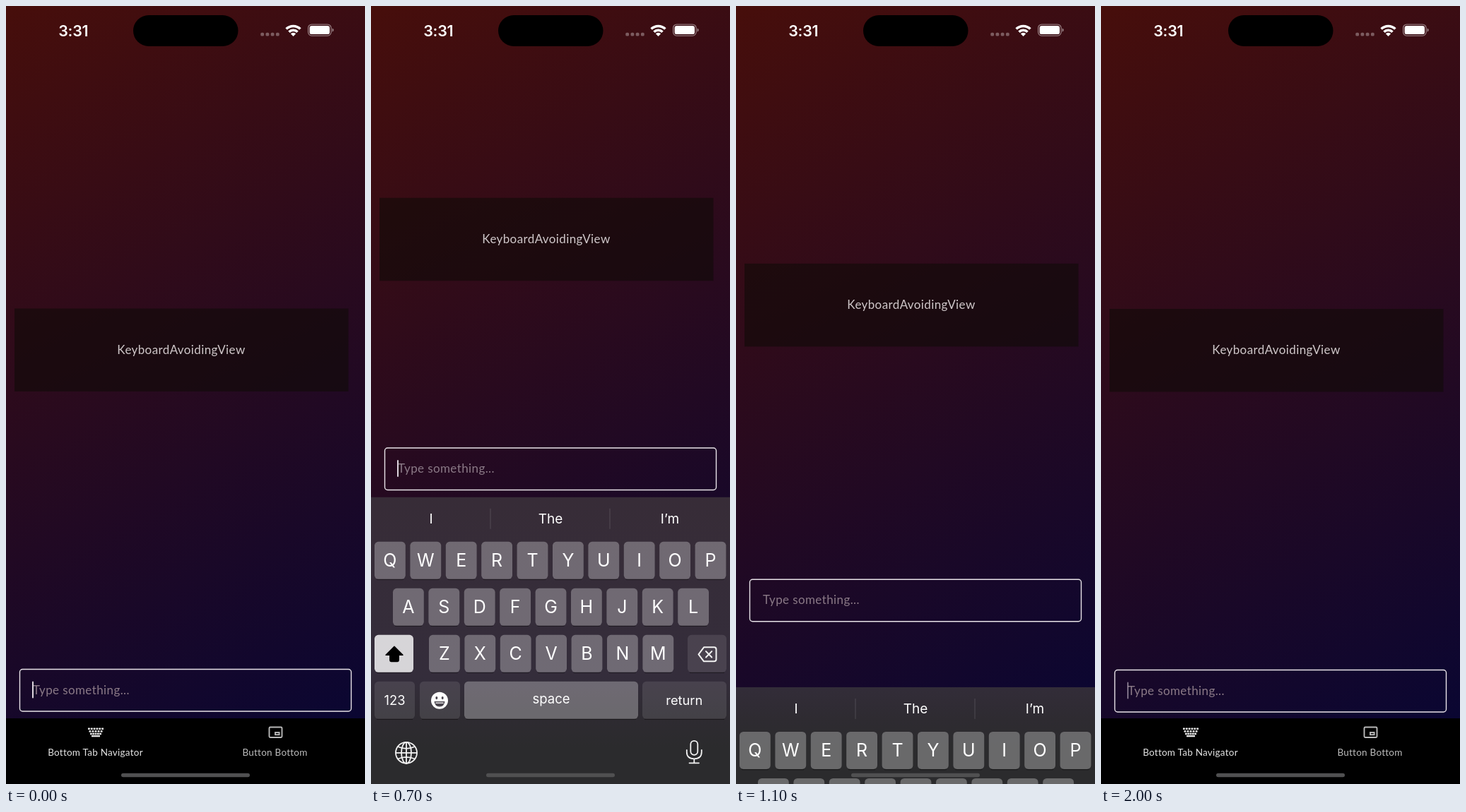
Animation of 508x1102 px, one loop 2.1 s. Source, as an HTML page:

```html
<!DOCTYPE html>
<html lang="en">
<head>
<meta charset="utf-8">
<title>Keyboard avoiding view</title>
<style>
  html, body { margin: 0; width: 100%; height: 100%; overflow: hidden; background: #000; }
  svg { display: block; width: 100%; height: 100%; }
  .app { font-family: Lato, "Open Sans", sans-serif; font-size: 17px; letter-spacing: .4px; }
  .tab { font-family: Lato, "Open Sans", sans-serif; font-size: 13.5px; letter-spacing: .25px; }
  .sys { font-family: Inter, Roboto, sans-serif; fill: #fff; }
  .mid { text-anchor: middle; }
  .line { fill: none; stroke: #f2f2f2; stroke-width: 2; stroke-linecap: round; stroke-linejoin: round; }
</style>
</head>
<body>
<svg viewBox="0 0 508 1102">
  <defs>
    <linearGradient id="sky" gradientUnits="userSpaceOnUse" x1="0" y1="0" x2="508" y2="1009">
      <stop offset="0" stop-color="#470e0b"/>
      <stop offset="1" stop-color="#0a0632"/>
    </linearGradient>
    <linearGradient id="blur" gradientUnits="userSpaceOnUse" x1="0" y1="693" x2="0" y2="1050">
      <stop offset="0" stop-color="#372c37"/>
      <stop offset=".72" stop-color="#342d3b"/>
      <stop offset=".89" stop-color="#2e2b31"/>
      <stop offset="1" stop-color="#2b2b2d"/>
    </linearGradient>
  </defs>

  <rect width="508" height="1102" fill="url(#sky)"/>

  <g id="card">
    <rect x="12" width="472.5" height="117.5" fill="#100a08" fill-opacity=".6"/>
    <text class="app mid" x="248" y="64" fill="#cfc7c9">KeyboardAvoidingView</text>
  </g>

  <g id="field">
    <rect x="19.5" y=".5" width="469" height="59.5" rx="4" fill="none" stroke="#e8e3e8" stroke-width="1.4"/>
    <text class="app" x="38" y="35.5" fill="#8a7986">Type something...</text>
    <rect id="caret" x="37" y="17.5" width="2" height="24" rx="1" fill="#ddd5dd"/>
  </g>

  <g id="tabs">
    <rect y="1009" width="508" height="93" fill="#000"/>
    <g id="keysIcon" fill="#e6e6e6"></g>
    <g fill="none" stroke="#b8b8b8">
      <rect x="372.5" y="1021.5" width="18" height="14.5" rx="1.5" stroke-width="1.9"/>
      <rect x="381" y="1029" width="5.6" height="3.2" stroke-width="1.9"/>
    </g>
    <text class="tab mid" x="126.5" y="1061.5" fill="#e4e4e4">Bottom Tab Navigator</text>
    <text class="tab mid" x="380.5" y="1061.5" fill="#bcbcbc">Button Bottom</text>
  </g>

  <rect id="sheet" width="508" height="420" fill="url(#blur)"/>
  <g id="board">
    <g id="keys"></g>
    <path d="M169 16V45M338 16V45" stroke="#fff" stroke-opacity=".15"/>
    <path d="M33 211.5L45 223.5H39.2V231Q39.2 232.7 37.5 232.7H28.5Q26.8 232.7 26.8 231V223.5H21Z"
      stroke="#000" stroke-width="1.4" stroke-linejoin="round"/>
    <path class="line" d="M471 212.5H485.5Q488.5 212.5 488.5 215.5V229.5Q488.5 232.5 485.5 232.5H471L463.5 222.5ZM474 218.3L482.2 226.7M482.2 218.3L474 226.7"/>
    <circle cx="97" cy="288" r="12" fill="#fff"/>
    <g fill="#48434c">
      <ellipse cx="92.8" cy="284.3" rx="1.5" ry="2.1"/>
      <ellipse cx="101.2" cy="284.3" rx="1.5" ry="2.1"/>
      <path d="M89.5 289.2H104.5Q103.5 296.8 97 296.8T89.5 289.2Z"/>
    </g>
    <path d="M91.3 290.7H102.7V292H91.3Z" fill="#fff"/>
    <g class="line" style="stroke-width:1.8">
      <circle cx="50" cy="362" r="15"/>
      <ellipse cx="50" cy="362" rx="7" ry="15"/>
      <path d="M50 347V377M35 362H65M38.5 353.5Q50 358.5 61.5 353.5M38.5 370.5Q50 365.5 61.5 370.5"/>
      <rect x="452.3" y="345" width="10" height="20" rx="5"/>
      <path d="M446.8 358V361Q446.8 370.5 457.3 370.5T467.8 361V358M457.3 370.5V376.5M450.5 376.5H464"/>
    </g>
  </g>

  <rect x="163" y="1086.7" width="182" height="5.6" rx="2.8" fill="#505051"/>

  <text class="sys mid" x="95.3" y="42.5" font-size="21.5" font-weight="600" letter-spacing="-.3">3:31</text>
  <rect x="180" y="13" width="148.5" height="44" rx="22"/>
  <g id="signal" fill="#fff" fill-opacity=".33"></g>
  <g fill="none" stroke="#fff" stroke-width="3.6">
    <path d="M396.6 32.6A14 14 0 0 1 416.4 32.6"/>
    <path d="M400.5 36.8A8.4 8.4 0 0 1 412.5 36.8"/>
  </g>
  <path d="M406.5 43L402.8 39.2A5.3 5.3 0 0 1 410.2 39.2Z" fill="#fff"/>
  <rect x="427.6" y="26.1" width="32.4" height="16" rx="5" fill="none" stroke="#fff" stroke-opacity=".45" stroke-width="1.3"/>
  <rect x="429.6" y="28.1" width="28.4" height="12" rx="3.2" fill="#fff"/>
  <path d="M461.6 31.5Q463.7 32.4 463.7 34.1T461.6 36.7Z" fill="#fff" fill-opacity=".5"/>
</svg>

<script>
const $ = id => document.getElementById(id);

function add(parent, tag, attrs, text) {
  const el = document.createElementNS(parent.namespaceURI, tag);
  for (const k in attrs) el.setAttribute(k, attrs[k]);
  if (text) el.textContent = text;
  parent.appendChild(el);
}

function label(x, y, size, text) {
  add($('keys'), 'text', { class: 'sys mid', x, y, 'font-size': size }, text);
}

function key(x, y, width, alpha) {
  const box = { x, width, height: 53, rx: 5.5 };
  add($('keys'), 'path', {
    d: `M${x + 3} ${y + 53.6}H${x + width - 3}`,
    stroke: '#000', 'stroke-opacity': .4, 'stroke-width': 1.4
  });
  add($('keys'), 'rect', { ...box, y, fill: '#fff', 'fill-opacity': alpha });
}

const LIGHT = .29, DARK = .1, PRESSED = .8;

[['QWERTYUIOP', 5, 63], ['ASDFGHJKL', 31, 129], ['ZXCVBNM', 82, 195]].forEach(([row, x0, y]) => {
  [...row].forEach((ch, i) => {
    const x = x0 + i * 50.4;
    key(x, y, 43.8, LIGHT);
    label(x + 21.9, y + 35.5, 25, ch);
  });
});
key(5, 195, 55, PRESSED);
key(448, 195, 55, DARK);
key(5, 261, 57, DARK);
key(69, 261, 57, DARK);
key(132, 261, 246, LIGHT);
key(384, 261, 119, DARK);
label(33.5, 294.5, 18.3, '123');
label(255, 292.5, 18.5, 'space');
label(443.3, 294.5, 18.3, 'return');
['I', 'The', 'I’m'].forEach((word, i) => label(85 + i * 169, 37.5, 19, word));

// Tab icon: three rows of small keys above a space bar
[[116, 6], [117.5, 5], [119, 5]].forEach(([x0, n], r) => {
  const step = (254 - 2 * x0 - 2.8) / (n - 1);
  for (let i = 0; i < n; i++)
    add($('keysIcon'), 'rect', { x: x0 + i * step, y: 1022.5 + r * 3.6, width: 2.8, height: 2.5 });
});
add($('keysIcon'), 'rect', { x: 121, y: 1033, width: 12, height: 2.3 });

for (let i = 0; i < 4; i++)
  add($('signal'), 'rect', { x: 360.3 + i * 7.2, y: 37.8, width: 4.8, height: 4.8, rx: 1.6 });

const LOOP = 2100, STEP = 100;
const clamp = v => Math.min(1, Math.max(0, v));

// Critically damped spring from 0 to 1
function spring(ms, rate) {
  const x = Math.max(0, ms) * rate / 1000;
  return 1 - (1 + x) * Math.exp(-x);
}

const shown = (t, open, close, rate) => spring(t - open, rate) * (1 - spring(t - close, rate));

function draw(t) {
  const top = 1102 - 409 * shown(t, 337, 983, 19.5);
  const fieldY = 940 - 316 * shown(t, 356, 1008, 21.75) - clamp(1 - t / 200);
  const cardY = 429 + (fieldY - 940) / 2;
  const blink = Math.abs((t + 550) % 1100 - 550);

  $('sheet').setAttribute('y', top);
  $('board').setAttribute('transform', `translate(0 ${top})`);
  $('field').setAttribute('transform', `translate(0 ${fieldY})`);
  $('card').setAttribute('transform', `translate(0 ${cardY})`);
  $('caret').setAttribute('opacity', t < 550 ? 1 : clamp((blink - 130) / 140));
}

function tick() {
  const t = performance.now() % LOOP;
  draw(Math.floor(t / STEP) * STEP);
  requestAnimationFrame(tick);
}
tick();
</script>
</body>
</html>
```
